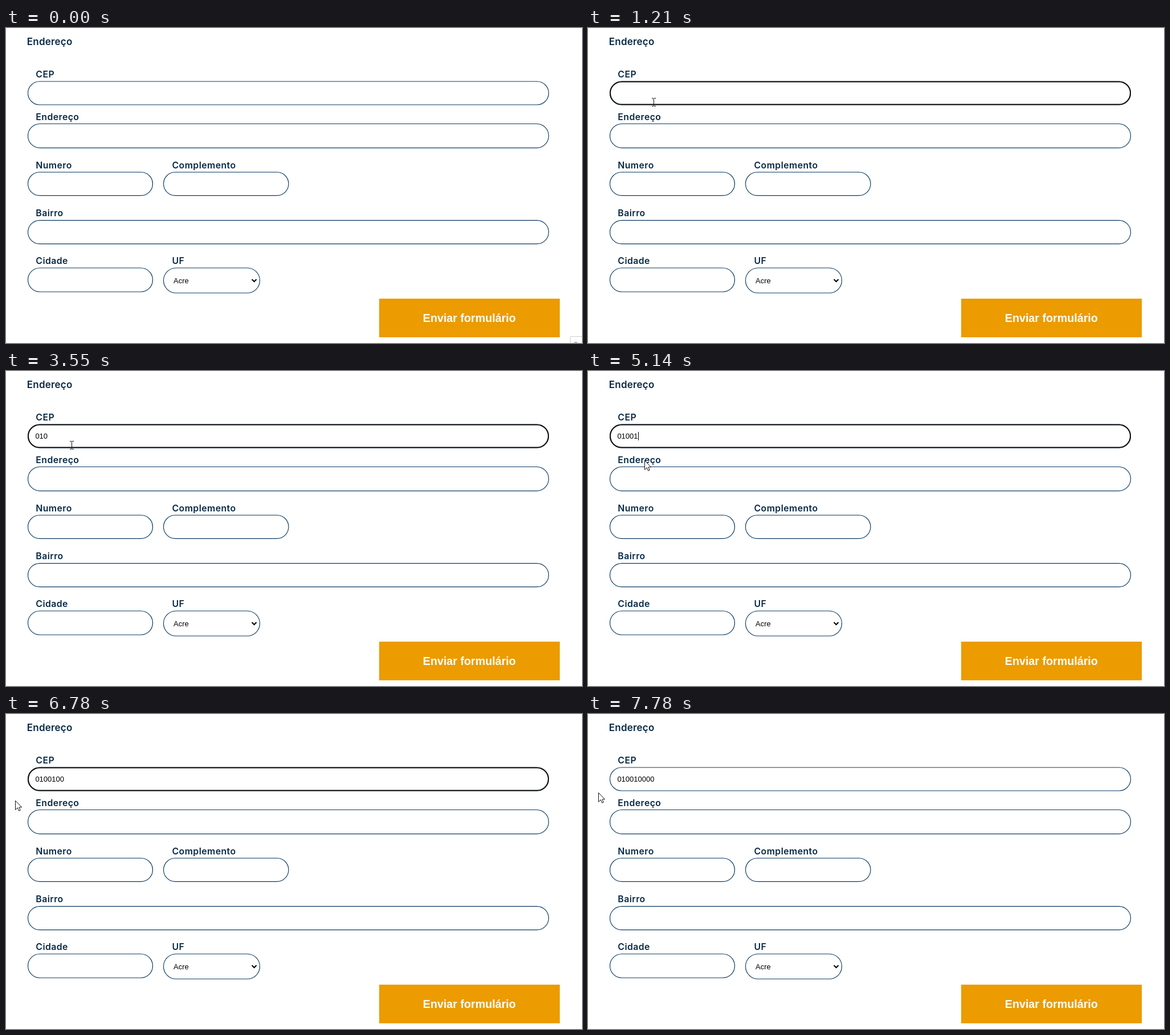
Write an HTML page that moves like this. It is 1011 px wide and 554 px high and loops after 8000 ms.

```html
<!DOCTYPE html>
<html lang="pt-BR">
<head>
<meta charset="utf-8">
<title>Endereço</title>
<style>
  html, body { margin: 0; width: 100%; height: 100%; overflow: hidden; background: #fff; }
  svg { display: block; width: 1011px; height: 554px; }
  .label { font: 600 15.8px Inter, "Open Sans", sans-serif; letter-spacing: .45px; fill: #062844; }
  .title { font-size: 17px; letter-spacing: .2px; }
  .field { fill: #fff; stroke: #0b3a63; stroke-width: 1.15; }
  .value { font: 13px "Liberation Sans", Arial, sans-serif; fill: #000; }
  .send { font: bold 19.7px "Liberation Sans", Arial, sans-serif; fill: #fff; text-anchor: middle; }
</style>
</head>
<body>
<svg viewBox="0 0 1011 554">
  <rect width="1011" height="554" fill="#fff"/>
  <g id="form"></g>
  <rect id="focus" x="39" y="94.5" width="913" height="40" rx="20" fill="#fff" stroke="#111" stroke-width="2"/>
  <text id="typed" class="value" x="51.4" y="119"></text>
  <rect id="caret" y="107" width="1" height="15"/>
  <text class="value" x="294" y="449">Acre</text>
  <path d="M431.6 442l4 4 4-4" fill="none" stroke="#000" stroke-width="2"/>
  <rect x="655" y="476" width="317" height="68" fill="#ec9b00"/>
  <text class="send" x="813.3" y="517">Enviar formulário</text>
  <g id="badge">
    <path d="M990.5 554V542.5H1011" fill="none" stroke="#ccc"/>
    <circle cx="1000" cy="555" r="3.5" fill="#bbb"/>
  </g>
  <path id="beam" d="M-3.5-7h3m1 0h3M0-6.5v13M-3.5 7h3m1 0h3" fill="none" stroke="#111"/>
  <path id="arrow" d="M.5.5V16.5L4.3 12.9 6.7 18.4 9.2 17.3 6.9 12H11.6Z" fill="#fff" stroke="#111"/>
</svg>
<script>
const LOOP = 8000;
const NS = "http://www.w3.org/2000/svg";
const $ = id => document.getElementById(id);

function add(tag, attrs, text) {
  const el = document.createElementNS(NS, tag);
  for (const k in attrs) el.setAttribute(k, attrs[k]);
  if (text) el.textContent = text;
  $("form").appendChild(el);
}

function field(name, x, top, right, bottom, labelY) {
  const h = bottom - top;
  add("rect", { class: "field", x, y: top, width: right - x, height: h, rx: h / 2 });
  add("text", { class: "label", x: x + (x < 100 ? 13.8 : 15), y: labelY }, name);
}

add("text", { class: "label title", x: 36.8, y: 30 }, "Endereço");
field("CEP", 38.5, 94, 952.5, 135, 86.6);
field("Endereço", 38.5, 168.5, 952.5, 210.8, 161.6);
field("Numero", 38.5, 253.5, 257.5, 294.6, 246.5);
field("Complemento", 276.5, 253.5, 496, 294.6, 246.5);
field("Bairro", 38.5, 338.3, 952.5, 379.6, 331.2);
field("Cidade", 38.5, 422, 257.5, 464, 415);
field("UF", 276.5, 422, 445.5, 466, 415);

const DIGITS = "010010000";
const keyTimes = [2010, 2140, 3000, 3750, 4680, 5630, 6230, 6850, 7250];
const caretX = [52, 58, 65, 73, 80, 88, 94, 101, 109, 116];
const focusAt = 680, blurAt = 7720, blink = 530;

// pointer steps: time, x, y, shape
const pointer = [
  [70, 560, 330, "arrow"], [140, 230, 160, "arrow"],
  [210, 126, 110, "beam"], [410, 122, 117, "beam"], [480, 118, 124, "beam"],
  [540, 115.5, 130.5, "beam"],
  [5140, 99, 157, "arrow"], [5210, 84, 164, "arrow"], [5280, 67, 165, "arrow"],
  [5350, 50, 162, "arrow"], [5420, 36, 159, "arrow"], [5490, 26, 156, "arrow"],
  [5560, 20, 154, "arrow"], [5700, 16, 152, "arrow"],
  [7320, 17, 149, "arrow"], [7450, 16, 145, "arrow"],
  [7650, 7, 140, "arrow"], [7720, 13, 139, "arrow"], [7780, 18, 138, "arrow"]
];

const show = (id, on) => $(id).setAttribute("visibility", on ? "visible" : "hidden");

function caretOn(t) {
  const last = keyTimes.filter(k => k <= t).pop() || focusAt;
  return Math.floor((t - last) / blink) % 2 === 0;
}

function draw(t) {
  const count = keyTimes.filter(k => k <= t).length;
  const focused = t >= focusAt && t < blurAt;
  $("typed").textContent = DIGITS.slice(0, count);
  $("caret").setAttribute("x", caretX[count]);
  show("focus", focused);
  show("caret", focused && caretOn(t));
  show("badge", t < 70);

  const step = pointer.filter(p => p[0] <= t).pop();
  for (const id of ["beam", "arrow"]) {
    const on = !!step && step[3] === id;
    show(id, on);
    if (on) $(id).setAttribute("transform", `translate(${step[1]} ${step[2]})`);
  }
}

const start = performance.now();
function tick() {
  draw((performance.now() - start) % LOOP);
  requestAnimationFrame(tick);
}
draw(0);
requestAnimationFrame(tick);
</script>
</body>
</html>
```
